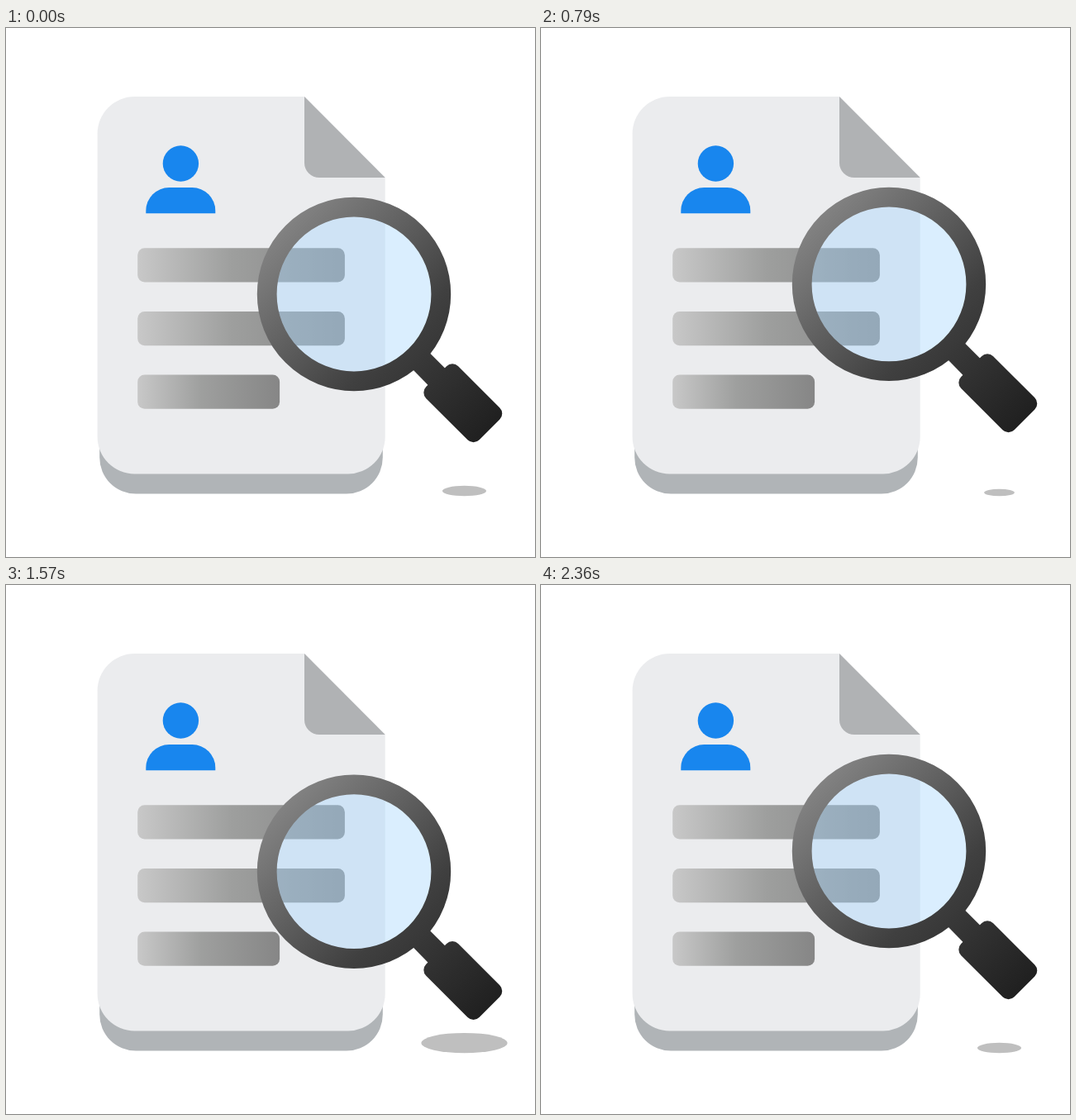
These frames come from a looping animation (640 px wide and 640 px high, 2.43 s). An HTML page with a canvas:

```html
<!DOCTYPE html>
<html lang="en">
<head>
<meta charset="utf-8">
<title>Profile search</title>
<style>
  html, body { margin: 0; width: 100%; height: 100%; overflow: hidden; background: #fff; }
  canvas { display: block; width: 100%; height: 100%; }
</style>
</head>
<body>
<canvas id="stage" width="640" height="640"></canvas>
<script>
const ctx = document.getElementById('stage').getContext('2d');
const LOOP = 2430, FPS = 14;

// [step, value] keys, linear in between
const LENS_Y = [[0, 0], [8, -20.4], [11, -12.1], [14, -2.4], [18, 12], [22, 24.7], [23, 27.5], [27, 14.7], [33, 0]];
const SHADOW_R = [[0, 26.6], [8, 10.7], [11, 18.4], [14, 27.1], [18, 40.5], [22, 52.1], [23, 54.3], [27, 41.6], [33, 26.6]];

function valueAt(keys, s) {
  for (let i = 1; i < keys.length; i++) {
    const [s0, v0] = keys[i - 1], [s1, v1] = keys[i];
    if (s <= s1) return v0 + (v1 - v0) * (s - s0) / (s1 - s0);
  }
  return keys[keys.length - 1][1];
}

function gradient(x0, y0, x1, y1, stops) {
  const g = ctx.createLinearGradient(x0, y0, x1, y1);
  stops.forEach(([at, color]) => g.addColorStop(at, color));
  return g;
}

function fillPath(d, color) {
  ctx.fillStyle = color;
  ctx.fill(new Path2D(d));
}

function roundRect(x, y, w, h, r, color) {
  ctx.beginPath();
  ctx.roundRect(x, y, w, h, r);
  ctx.fillStyle = color;
  ctx.fill();
}

function ellipse(x, y, rx, ry, color) {
  ctx.beginPath();
  ctx.ellipse(x, y, rx, ry, 0, 0, Math.PI * 2);
  ctx.fillStyle = color;
  ctx.fill();
}

function bar(y, w) {
  const x = 159.2;
  roundRect(x, y, w, 41.3, 8.5, gradient(x, 0, x + w, 0,
    [[0, '#c8c8c8'], [0.45, '#9e9f9e'], [1, '#868686']]));
}

function drawPage() {
  roundRect(113.2, 400, 342.6, 163.6, [0, 0, 44, 44], '#b0b4b7');
  fillPath('M156 83H361L458.7 181V494.5A45 45 0 0 1 413.7 539.5H155.6A45 45 0 0 1 110.6 494.5V128A45 45 0 0 1 155.6 83Z', '#ebecee');
  fillPath('M361 83L458.7 181H379A18 18 0 0 1 361 163Z', '#b0b2b4');
  ellipse(211.4, 164, 21.7, 21.7, '#1886ee');
  fillPath('M169.3 224.2V221A28 28 0 0 1 197.3 193H225.3A28 28 0 0 1 253.3 221V224.2Z', '#1886ee');
  bar(266.2, 250.7);
  bar(342.9, 250.7);
  bar(419.5, 171.9);
}

function drawMagnifier(dy) {
  const metal = gradient(338, 239, 585, 486,
    [[0, '#828282'], [0.55, '#404040'], [1, '#202020']]);
  ctx.save();
  ctx.translate(0, dy);
  ellipse(421, 322, 94, 94, 'rgba(166,214,253,0.42)');
  fillPath('M492.5 413.5L513 393.5L534 414.5L513.5 435Z', metal);

  // The grip is outlined in turned space and filled in stage space
  const grip = new Path2D(), box = new Path2D();
  box.roundRect(-45.5, -27.5, 91, 55, 10);
  grip.addPath(box, new DOMMatrix().translate(552.8, 453.8).rotate(45));
  ctx.fillStyle = metal;
  ctx.fill(grip);

  ctx.beginPath();
  ctx.arc(421, 322, 105.3, 0, Math.PI * 2);
  ctx.lineWidth = 23.8;
  ctx.strokeStyle = metal;
  ctx.stroke();
  ctx.restore();
}

function draw(step) {
  ctx.fillStyle = '#fff';
  ctx.fillRect(0, 0, 640, 640);
  drawPage();
  const r = valueAt(SHADOW_R, step), ry = r * 0.234;
  ellipse(554.5, 566.3 - ry, r, ry, '#bfbfbf');
  drawMagnifier(valueAt(LENS_Y, step));
}

// Motion runs in 14 steps per second, starts rounded to 10 ms
const startOf = step => Math.round(step * 100 / FPS) * 10;

function frame() {
  const t = performance.now() % LOOP;
  let step = Math.ceil(t * FPS / 1000) + 1;
  while (step > 0 && startOf(step) > t) step--;
  draw(Math.min(step, 33));
  requestAnimationFrame(frame);
}
frame();
</script>
</body>
</html>
```
